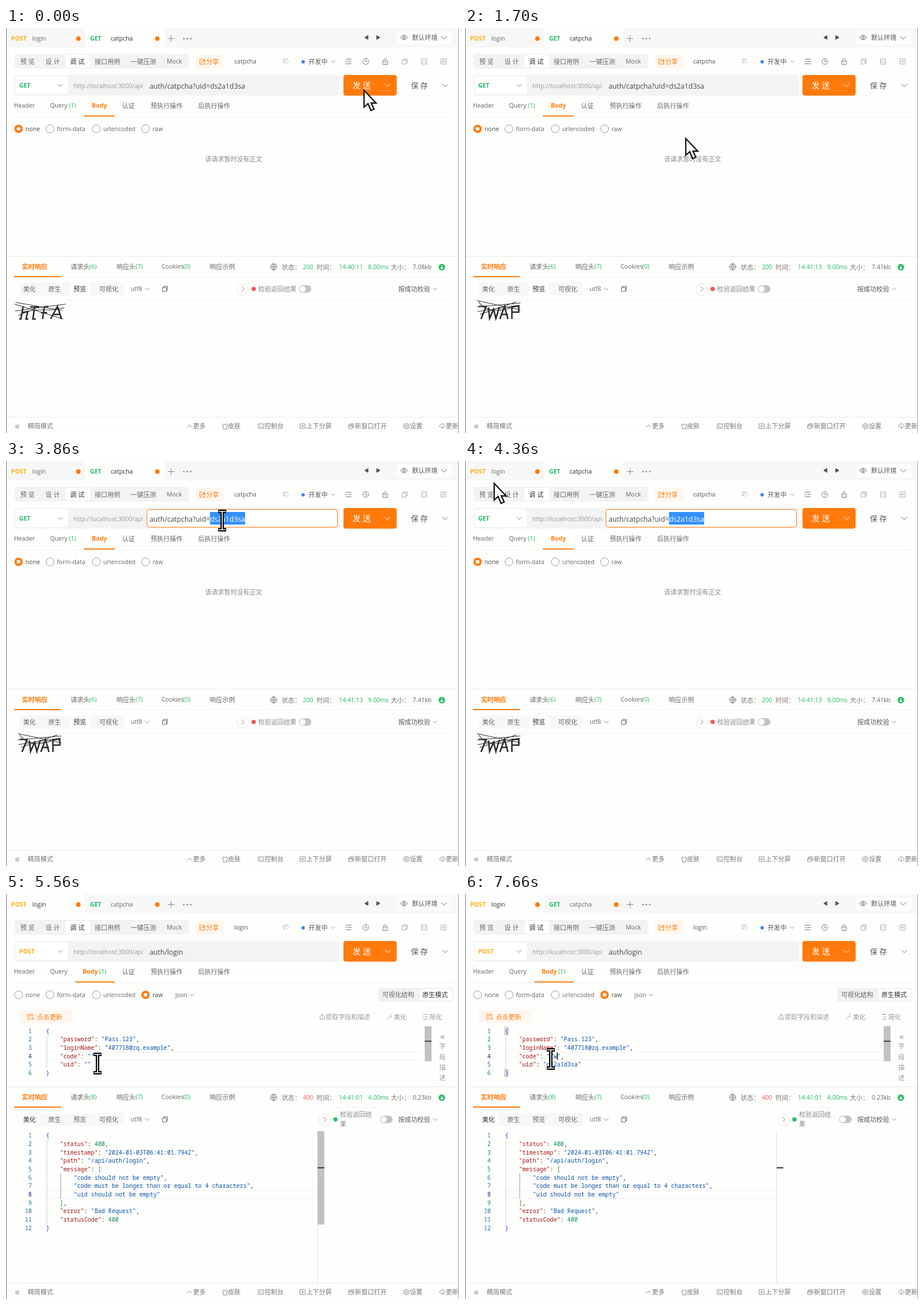
These frames come from a looping animation (792 px wide and 707 px high, 8000 ms). An HTML page with a canvas:

```html
<!DOCTYPE html>
<html lang="zh">
<head>
<meta charset="utf-8">
<style>
html, body { margin: 0; width: 100%; height: 100%; overflow: hidden; background: #fefefd; }
canvas { display: block; }
</style>
</head>
<body>
<canvas id="stage" width="792" height="707"></canvas>
<script>
const ctx = document.getElementById('stage').getContext('2d');
const LOOP = 8000;
const ORANGE = '#ff7a0a', GREEN = '#22b866', RED = '#f4545a', TEXT = '#666', DARK = '#303030', PALE = '#999';
const UI = '"Open Sans", "Noto Sans CJK SC", "Noto Sans CJK", sans-serif';
const MONO = '10.08px "Noto Sans Mono", monospace';
const CHAR = 6.048, LINE = 14.66;

// Events on the loop's clock
const RESPONSE = 1180, FOCUS = 2280, SELECT = 2400, SWITCH = 4620, LOADED = 4700,
      UID_CLICK = 5600, PASTE = 5950, CODE_CLICK = 6600, KEY_1 = 7530, KEY_2 = 7660;

// time, x, y of the pointer
const POINTER = [[30, 625, 108], [360, 628, 107], [1250, 628, 107], [1700, 385, 192], [1760, 385, 192],
  [2240, 378, 104], [3860, 378, 104], [4340, 50, 38], [4400, 50, 38], [4540, 54, 20], [4680, 54, 20],
  [4960, 181, 278], [5060, 181, 278], [5480, 160, 296], [5600, 160, 296], [6100, 156, 293],
  [6360, 156, 293], [6560, 150, 288]];

const RESPONSE_JSON = `{
    "status": 400,
    "timestamp": "2024-01-03T06:41:01.794Z",
    "path": "/api/auth/login",
    "message": [
        "code should not be empty",
        "code must be longer than or equal to 4 characters",
        "uid should not be empty"
    ],
    "error": "Bad Request",
    "statusCode": 400
}`;

function text(s, x, y, color = TEXT, weight = 400, size = /[\u4e00-\u9fff]/.test(s) ? 11.1 : 10.6) {
  ctx.font = `${weight} ${size}px ${UI}`;
  ctx.fillStyle = color;
  ctx.fillText(s, x, y + size * .37);
}

function box(x, y, w, h, fill, r = 0, stroke) {
  ctx.beginPath();
  ctx.roundRect(x, y, w, h, r);
  if (fill) { ctx.fillStyle = fill; ctx.fill(); }
  if (stroke) { ctx.strokeStyle = stroke; ctx.lineWidth = 1; ctx.stroke(); }
}

function dot(x, y, r, fill, stroke, width = 1) {
  ctx.beginPath();
  ctx.arc(x, y, r, 0, 7);
  if (fill) { ctx.fillStyle = fill; ctx.fill(); }
  if (stroke) { ctx.strokeStyle = stroke; ctx.lineWidth = width; ctx.stroke(); }
}

function line(d, x = 0, y = 0, color = '#888', width = 1, fill) {
  const path = new Path2D(d);
  ctx.save();
  ctx.translate(x, y);
  if (fill) { ctx.fillStyle = fill; ctx.fill(path); }
  ctx.strokeStyle = color;
  ctx.lineWidth = width;
  ctx.stroke(path);
  ctx.restore();
}

const chevron = (x, y, color = '#888', s = 4) => line(`M${-s} ${-s / 2}L0 ${s / 2}L${s} ${-s / 2}`, x, y, color);

const SQUARE = 'M-4.5 -4.5h9v9h-9z';
const COPY = 'M-4.5 -2.5h7v7h-7zM-2.5 -2.5v-2h7v7h-2';

function tabs(post) {
  box(0, 0, 792, 34, '#f7f7f7');
  box(post ? 1 : 138, 0, post ? 137 : 139, 34, '#fefefd');
  text('POST', 9, 18.5, '#f7b31c', 700);
  text('login', 46, 18.5, post ? DARK : TEXT);
  dot(126.5, 18.5, 4, ORANGE);
  text('GET', 147, 18.5, GREEN, 700);
  text('catpcha', 183, 18.5, post ? TEXT : DARK);
  dot(264.5, 18.5, 4, ORANGE);
  line('M-6 0h12M0 -6v12', 288.5, 18.5);
  for (const x of [311, 317, 323]) dot(x, 18.5, 1.3, '#777');
  line('M3 -3.5L-3 0L3 3.5z', 630, 16.5, '#555', 1, '#555');
  line('M-3 -3.5L3 0L-3 3.5z', 651, 16.5, '#555', 1, '#555');
  box(683, 5, 98, 24, '#fdfdfd', 4);
  line('M-6 0Q0 -8 6 0Q0 8 -6 0z', 696, 16.5, '#555');
  dot(696, 16.5, 1.8, null, '#555');
  text('默认环境', 710, 17, '#555');
  chevron(766, 17, '#666', 5);
}

function toolbar(post) {
  box(15, 45, 305, 26, '#f3f3f3', 4);
  box(104, 47, 43, 22, '#fff', 3);
  text('预 览', 25, 58.5);
  text('设 计', 69, 58.5);
  text('调 试', 112, 58.5, DARK, 500);
  text('接口用例', 155, 58.5);
  text('一键压测', 218, 58.5);
  text('Mock', 281, 58.5);
  box(332, 46, 50, 25, '#fff7ef', 3);
  line('M0 -4h-4.5v8.5h8.5v-4M-2 2C-1 -1 1 -2 4 -2M2 -4.5l2.5 2.5l-2.5 2.5', 343.5, 58.5, ORANGE, 1.1);
  text('分享', 350, 58.5, ORANGE);
  text(post ? 'login' : 'catpcha', 399, 58.5, '#555');
  line('M-6 -4h9M-6 -1h6M-6 2h4M0 4l5 -5', 490, 58.5, '#aaa');
  dot(519.5, 59, 3, '#3a86ff');
  text('开发中', 529, 58.5, '#555');
  chevron(572, 58.5, '#999', 3.5);
  line('M-5 -4h10M-1 0h6M-5 4h10M-5 -1l2 1l-2 1', 599, 58.5, '#777');
  dot(629, 58.5, 5, null, '#777');
  line('M0 -3v3.5h3', 629, 58.5, '#777');
  line('M-4 -1h8v6h-8zM-2.5 -1v-2q2.5 -4 5 0M0 1v2', 663, 58.5, '#777');
  line(COPY, 697, 58.5, '#aaa');
  line(SQUARE + 'M-1 -2l-2 2l2 2M1 -2l2 2l-2 2', 731, 58.5, '#aaa');
  line(SQUARE + 'M1 -3l-3 3h4l-3 3', 765, 58.5, '#aaa');
}

function urlBar(post, focused, selected) {
  const path = 'auth/catpcha?uid=', uid = 'ds2a1d3sa', size = 12.25;
  box(15, 82, 569, 36, '#f3f3f3', 4);
  box(17, 84, 91, 31, '#fff', 3);
  text(post ? 'POST' : 'GET', 23, 100, post ? '#f7b31c' : GREEN, 700);
  chevron(95, 100);
  text('http://localhost:3000/api', 118, 101, PALE);
  if (focused) box(246.5, 84.5, 333, 31, '#fff', 4, ORANGE);
  text(post ? 'auth/login' : path + uid, 251, 101, '#444', 400, size);
  if (selected) {
    const x = 251 + ctx.measureText(path).width, w = ctx.measureText(uid).width;
    box(x, 89, w, 22, '#3390ff');
    text(uid, x, 101, '#fff', 400, size);
  } else if (focused) box(377, 92, 1, 17, '#333');
  box(590, 82, 93, 36, ORANGE, 4);
  text('发 送', 606, 100, '#fff', 400, 14);
  chevron(667, 100, '#fff', 5);
  text('保 存', 708, 100, '#555', 400, 13);
  chevron(768, 100, '#666', 5);
  line('M693 82.5H781M693 118.5H781', 0, 0, '#f6f6f6');
}

function radio(x, label, on) {
  if (on) dot(x, 176, 5.3, '#fff', ORANGE, 4);
  else dot(x, 176, 7, '#fff', '#999');
  text(label, x + 12, 176, on ? '#444' : TEXT);
}

function requestTabs(post) {
  text('Header', 14, 135.5);
  text('Query', 77, 135.5);
  text('Body', post ? 134 : 150, 135.5, ORANGE, 700);
  text('(1)', post ? 163 : 110, 135.5, GREEN);
  text('认证', 203, 135.5);
  text('预执行操作', 253, 135.5);
  text('后执行操作', 336, 135.5);
  box(14, 155, 769, 1, '#f1f1f1');
  const x = post ? 121 : 136;
  box(x, 152.5, 190 - x, 2, ORANGE);
  radio(22, 'none', !post);
  radio(77, 'form-data');
  radio(158, 'urlencoded');
  radio(244, 'raw', post);
}

function code(source, x, y, active) {
  const colors = s => /^".*":$/.test(s) ? '#a31515' : s[0] === '"' ? '#0451a5' :
    /[{}]/.test(s) ? '#0431fa' : /[[\]]/.test(s) ? '#319331' : /\d/.test(s) ? '#098658' : '#222';
  source.split('\n').forEach((row, i) => {
    const cy = y + i * LINE, base = cy + 3.6;
    if (i + 1 === active) box(x, cy - 7, (y < 400 ? 732 : 545) - x, 14, null, 0, '#f0f0f0');
    const indent = row.search(/\S/);
    for (let n = 0; n < indent; n += 4) box(x + 1 + n * CHAR, cy - 7.3, 1, LINE, n + 4 < indent || indent === 4 ? '#d0d0d0' : '#999');
    ctx.font = MONO;
    ctx.textAlign = 'right';
    ctx.fillStyle = i + 1 === active ? '#0b216f' : '#237893';
    ctx.fillText(i + 1, 45, base);
    ctx.textAlign = 'left';
    for (const m of row.matchAll(/"[^"]*":|"[^"]*"|[{}]|[[\]]|\d+|,/g)) {
      const key = m[0].endsWith('":');
      ctx.fillStyle = colors(m[0]);
      ctx.fillText(key ? m[0].slice(0, -1) : m[0], x + m.index * CHAR, base);
      if (key) {
        ctx.fillStyle = '#222';
        ctx.fillText(':', x + (m.index + m[0].length - 1) * CHAR, base);
      }
    }
  });
}

function editor(t) {
  text('json', 296, 176);
  chevron(325, 176, '#888', 3.5);
  box(651, 164, 131, 24, '#f1f1f1', 4);
  box(723, 166, 57, 20, '#fff', 3);
  text('可视化结构', 658, 176);
  text('原生模式', 728, 176, DARK, 500);
  box(23, 203, 93, 22, '#fff7ef', 3);
  line('M4 0v-4.5h-9v9h5M-3 -2h5M-3 1h3M1 3h4M3 1l2 2l-2 2', 43, 214.5, ORANGE);
  text('点击更新', 54, 214.5, ORANGE);
  line('M-4 -1v5h8v-5M0 2v-6M-2.5 -2l2.5 -2.5l2.5 2.5', 553, 214.5, PALE);
  text('提取字段和描述', 559, 214.5, PALE);
  line('M-4 4l6 -6M0 -4h2M3 -1v2M3 -4l1 -1', 671, 214.5, PALE);
  text('美化', 678, 214.5, PALE);
  line('M-4 -4h8M-1 0h5M-4 4h8M-4 0h1', 733, 214.5, PALE);
  text('简化', 740, 214.5, PALE);

  box(14, 230, 733, 1, '#f5f5f5');
  box(732, 231, 12, 61, '#c1c1c1');
  const active = t >= UID_CLICK && t < CODE_CLICK ? 5 : 4;
  box(732, active === 5 ? 265 : 256, 12, 2, '#444');
  text('«', 759, 248, PALE, 400, 17);
  [...'字段描述'].forEach((c, i) => text(c, 757.5, 266 + i * 18.4, PALE));
  if (t < LOADED) return;

  const focused = t >= UID_CLICK;
  if (focused) for (const y of [239, 312.3]) box(69.5, y - 6.5, 6, 13, '#e4e8e6', 0, '#b9b9b9');
  const pin = t >= KEY_2 ? '7w' : t >= KEY_1 ? '7' : '';
  const uid = t >= PASTE ? 'ds2a1d3sa' : '';
  code(`{
    "password": "Pass.123",
    "loginName": "407718@zq.example",
    "code": "${pin}",
    "uid": "${uid}"
}`, 70, 239, active);
  if (focused) {
    const column = active === 5 ? 12 + uid.length : 13 + pin.length;
    box(70 + column * CHAR, 239 + (active - 1) * LINE - 6.5, 1.5, 13, '#111');
  }
}

function captcha(fresh) {
  const letters = fresh
    ? 'M24 486H37L28 508M41 488L43 507L50 491L54 507L60 487M61 508L69 486L75 508M64 500H75M82 508V486H94V496H82'
    : 'M30 486L26 508h-3M28 497L38 495L35 508h4M42 487H58M50 487L47 508h5M64 508L67 487L74 486M61 497H72M78 508L90 486L97 508M82 500H95';
  const strikes = fresh
    ? 'M21 476L97 492M21 487L97 480M24 478C40 502 70 492 96 484M22 495L95 484M26 500L90 478'
    : 'M15 482L100 508M16 494L104 482M17 479L98 493M22 502C50 484 75 498 102 488';
  line(letters, 0, 0, '#2a2a2a', 2.6);
  line(strikes, 0, 0, '#333', 1.1);
}

function response(t, post) {
  const top = post ? -62 : 0, fresh = t >= RESPONSE, y = 416.5 + top, row = 455.5 + top;
  box(1, 398 + top, 790, 1, '#e9e9e9');
  text('实时响应', 28, y, ORANGE, 700);
  box(14, 433 + top, 82, 2, ORANGE);
  box(96, 434 + top, 687, 1, '#f1f1f1');
  [['请求头', post ? 8 : 6, 113, 146], ['响应头', 7, 193, 226.5], ['Cookies', 0, 272, 310]].forEach(([name, n, x, nx]) => {
    text(name, x, y);
    text(`(${n})`, nx, y, GREEN);
  });
  text('响应示例', 356, y);

  dot(468, y + .5, 5.5, null, '#777');
  line('M-5.5 0h11M0 -5.5v11M0 -5.5Q-5 0 0 5.5Q5 0 0 -5.5', 468, y + .5, '#777', .8);
  text('状态：', 482, y + 1, '#777');
  text(post ? '400' : '200', 519, y + 1, post ? RED : GREEN);
  text('时间：', 543, y + 1, '#777');
  text(post ? '14:41:01' : fresh ? '14:41:13' : '14:40:11', 582, y + 1, GREEN);
  text(post ? '4.00ms' : fresh ? '9.00ms' : '8.00ms', 633, y + 1, GREEN);
  text('大小：', 673, y + 1, '#777');
  text(post ? '0.23kb' : fresh ? '7.41kb' : '7.08kb', 711, y + 1);
  dot(762, y + 1, 5.7, '#2ebd68');
  line('M0 -3v6M-2.5 .5l2.5 2.5l2.5 -2.5', 762, y + 1, '#fff', 1.2);

  box(24, row - 11, 182, 22, '#f7f7f7', 3);
  const chosen = post ? '美化' : '预览';
  [['美化', 30], ['原生', 74], ['预览', 118], ['可视化', 163]].forEach(([s, x]) => {
    if (s === chosen) box(x - 6, row - 10, 35, 20, '#fdfdfd', 3);
    text(s, x, row, s === chosen ? DARK : TEXT);
  });
  text('utf8', 218, row);
  chevron(247, row);
  line(COPY, 278, row, '#666');

  const arrowX = post ? 557 : 414;
  dot(arrowX, row + 1, 10, '#fff', '#e6e6e6');
  line('M-2 -4.5L2.5 0L-2 4.5', arrowX, row, '#888');
  dot(post ? 576 : 433, row, 3.8, post ? '#2ebd68' : RED);
  if (post) {
    text('校验返回结', 584, row - 9, '#888');
    text('果', 584, row + 8, '#888');
  } else text('校验返回结果', 441, row, '#888');
  const knob = post ? 654 : 512;
  box(knob, row - 6.5, 22, 13, '#c4c4c4', 6.5);
  dot(knob + 6.5, row, 5.2, '#fff');
  text('按成功校验', 686, row, '#555');
  chevron(750, row, '#888', 3.5);
  box(post ? 557 : 14, 475 + top, post ? 226 : 769, 1, '#f4f4f4');

  if (!post) captcha(fresh);
  else if (t >= LOADED) {
    code(RESPONSE_JSON, 70, 421.8, 8);
    box(544, 414, 1, 265, '#dedede');
    ctx.globalAlpha = Math.max(0, Math.min(1, (6200 - t) / 200));
    box(545, 414, 11.5, 163, '#c1c1c1');
    ctx.globalAlpha = 1;
    box(545, 477, 11.5, 2, '#333');
  }
}

function footer() {
  box(1, 679, 790, 1, '#ececec');
  const icons = [
    ['更多', 327, 'M-10 2l4 -4l4 4'], ['皮肤', 388, 'M-8 -4l-2 3l2 1v5h6v-5l2 -1l-2 -3q-3 3 -6 0'],
    ['控制台', 452, 'M-11 -4h9v8h-9zM-9 -2l2 2l-2 2M-6 2h2'], ['上下分屏', 525, 'M-11 -4h9v8h-9zM-9 0h5M-6.5 -2v4'],
    ['新窗口打开', 610, 'M-11 -2h7v6h-7zM-9 -2v-2h7v6h-2M-11 0h7'],
    ['设置', 706, 'M-6 -5l4.5 2.5v5l-4.5 2.5l-4.5 -2.5v-5zM-8 0a2 2 0 1 0 4 0a2 2 0 1 0 -4 0'],
    ['更新', 769, 'M-9 3q-4 -3 0 -5q3 -5 6 0q4 2 0 5M-6 -1v5M-8 2l2 2l2 -2']];
  text('«', 15.5, 694, '#888', 400, 17);
  text('精简模式', 38, 695, '#777');
  for (const [s, x, d] of icons) {
    line(d, x, 695);
    text(s, x, 695, '#777');
  }
}

function pointerAt(t) {
  let a = POINTER[0];
  for (const b of POINTER) {
    if (t < b[0]) {
      if (a === b) break;
      const u = Math.max(0, (t - a[0]) / (b[0] - a[0])), e = u * u * (3 - 2 * u);
      return [a[1] + (b[1] - a[1]) * e, a[2] + (b[2] - a[2]) * e];
    }
    a = b;
  }
  return a.slice(1);
}

function pointer(t, post) {
  const [x, y] = pointerAt(t);
  const overText = post ? y > 231 : x > 246 && x < 583 && y > 83 && y < 117;
  if (overText) {
    const beam = 'M-7 -16H7M-7 16H7M0 -16V16';
    line(beam, x, y, '#000', 6);
    line('M-6 -16H6M-6 16H6M0 -16V16', x, y, '#fff', 1.6);
  } else line('M1 1V30L8 24L13 36L18.5 33.5L13.5 23H22z', x, y, '#111', 2.3, '#fff');
}

function frame(now) {
  const t = now % LOOP, post = t >= SWITCH;
  ctx.fillStyle = '#fefefd';
  ctx.fillRect(0, 0, 792, 707);
  tabs(post);
  toolbar(post);
  urlBar(post, !post && t >= FOCUS, !post && t >= SELECT);
  requestTabs(post);
  if (post) editor(t);
  else text('该请求暂时没有正文', 348, 228.5, '#888');
  response(t, post);
  footer();
  box(0, 0, 1, 707, '#777');
  box(791, 0, 1, 707, '#999');
  pointer(t, post);
}

const start = performance.now();
function tick() {
  frame(performance.now() - start);
  requestAnimationFrame(tick);
}
tick();
</script>
</body>
</html>
```
